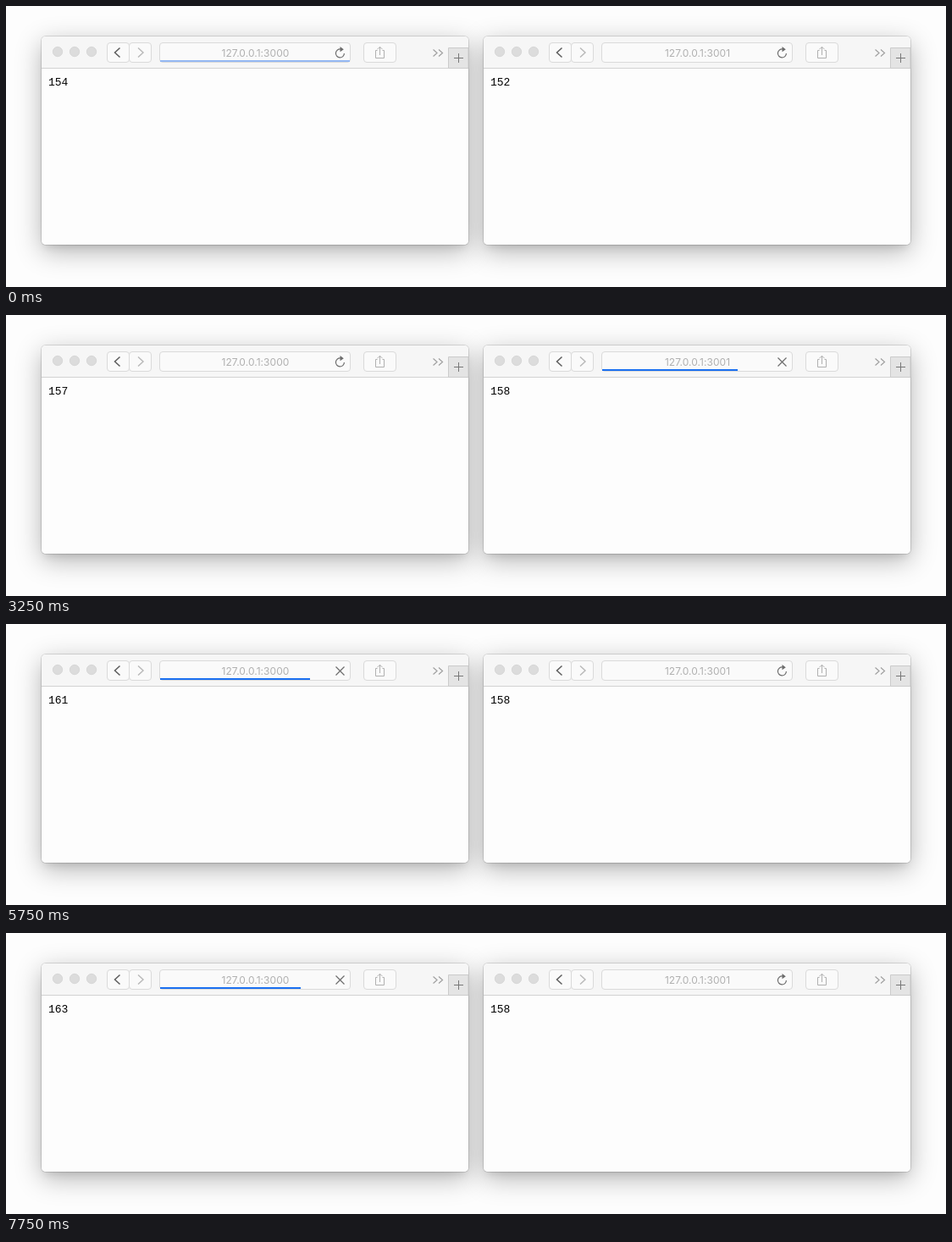
Write an HTML page that moves like this. It is 1110 by 332 pixels and loops after 8000 ms.

```html
<!DOCTYPE html>
<html lang="en">
<head>
<meta charset="utf-8">
<title>Two browser windows</title>
<style>
  html, body { margin: 0; width: 100%; height: 100%; overflow: hidden; background: #fdfdfd; }
  .shadow {
    position: absolute; left: 42px; top: 36px; width: 504px; height: 246px; border-radius: 5px;
    box-shadow: 0 0 0 1px rgba(0, 0, 0, .12), 0 8px 31px rgba(0, 0, 0, .29), 0 7px 10px -4px rgba(0, 0, 0, .1);
  }
  .shadow.right { left: 564px; }
  svg { position: absolute; left: 0; top: 0; display: block; }
  .button { fill: #fafafa; stroke: #dadada; }
  .line { fill: none; }
  .address { font: 12px Inter, sans-serif; letter-spacing: .05px; fill: #b0b0b0; text-anchor: middle; }
  .count { font: 13px "Liberation Mono", monospace; fill: #000; }
</style>
</head>
<body>
<div class="shadow"></div>
<div class="shadow right"></div>
<svg id="stage" width="1110" height="332" viewBox="0 0 1110 332"></svg>
<script>
const LOOP = 8000, STEP = 250, BAR_LEFT = 182, BAR_FULL = 224;
const stage = document.getElementById('stage');

const button = (x, width) =>
  `<rect class="button" x="${x}.5" y="43.5" width="${width}" height="23" rx="3.5"/>`;
const line = (d, color, width = 1.2) =>
  `<path class="line" d="${d}" stroke="${color}" stroke-width="${width}"/>`;

function addWindow(offset, address) {
  const group = document.createElementNS('http://www.w3.org/2000/svg', 'g');
  group.setAttribute('transform', `translate(${offset} 0)`);
  group.innerHTML = `
    <rect x="42" y="36" width="504" height="246" rx="5" fill="#fdfdfd"/>
    <path d="M42 73V41a5 5 0 0 1 5-5H541a5 5 0 0 1 5 5V73z" fill="#f6f6f6"/>
    <path d="M42 73.5H546" stroke="#d2d2d2"/>
    ${[61, 81, 101].map(x => `<circle cx="${x}" cy="54" r="5.7" fill="#dcdcdc" stroke="#d0d0d0" stroke-width=".7"/>`).join('')}
    ${button(119, 26)}${button(145, 26)}${button(181, 225)}${button(422, 38)}
    ${line('M134.5 49.5L128.5 55L134.5 60.5', '#5c5c5c', 1.5)}
    ${line('M156 49.5L162 55L156 60.5', '#b8b8b8', 1.4)}
    ${line('M438.5 52.5H436.5V61.5H446.5V52.5H444.5M441.5 58V48.5M438.5 51.2L441.5 48.2L444.5 51.2', '#b0b0b0', 1)}
    ${line('M504.5 51.5L509 55.5L504.5 59.5M511 51.5L515.5 55.5L511 59.5', '#a0a0a0')}
    <path d="M522.5 73.5V49.5H546V73.5z" fill="#e4e4e4" stroke="#cbcbcb"/>
    ${line('M529 61.5H540M534.5 56V67', '#777', 1)}
    <text class="address" x="294.5" y="60">${address}</text>
    <g class="reload">
      ${line('M395.2 51A5 5 0 1 0 399.4 56', '#6c6c6c')}
      <path d="M394.5 48L398.8 51.2L394.5 54.3z" fill="#6c6c6c"/>
    </g>
    <g class="stop">${line('M389.5 50.5L399.5 60.5M399.5 50.5L389.5 60.5', '#6c6c6c')}</g>
    <rect class="bar" x="${BAR_LEFT}" y="64" height="2"/>
    <text class="count" x="50" y="94.4"></text>`;
  stage.append(group);
  const [reload, stop, bar, count] =
    ['reload', 'stop', 'bar', 'count'].map(name => group.querySelector('.' + name));

  return ({ value, width, loading }) => {
    reload.style.visibility = loading ? 'hidden' : 'visible';
    stop.style.visibility = loading ? 'visible' : 'hidden';
    bar.setAttribute('width', width);
    bar.setAttribute('fill', loading ? '#1a6ff0' : '#94b8f3');
    count.textContent = value;
  };
}

// A page load takes four steps: full bar fading, idle, short bar, long bar with the new count.
function pageLoad(phase, before, after, longWidth) {
  return {
    value: phase === 3 ? after : before,
    width: [BAR_FULL, 0, 24, longWidth][phase],
    loading: phase > 1
  };
}

const drawLeft = addWindow(0, '127.0.0.1:3000');
const drawRight = addWindow(522, '127.0.0.1:3001');
const leftCounts = [154, 155, 156, 157, 159, 160, 161, 162, 163];
const longWidths = [159, 156, 153, 162, 159, 177, 161, 166];

function leftState(step) {
  const cycle = Math.floor(step / 4);
  return pageLoad(step % 4, leftCounts[cycle], leftCounts[cycle + 1], longWidths[cycle]);
}

// The right window reloads once, between two loads on the left.
function rightState(step) {
  if (step === 12 || step === 13) return pageLoad(step - 10, 152, 158, 160);
  if (step === 14) return pageLoad(0, 158, 158, 0);
  return pageLoad(1, step < 12 ? 152 : 158, 158, 0);
}

const start = performance.now();
function frame() {
  const step = Math.floor((performance.now() - start) % LOOP / STEP);
  drawLeft(leftState(step));
  drawRight(rightState(step));
  requestAnimationFrame(frame);
}
frame();
</script>
</body>
</html>
```
